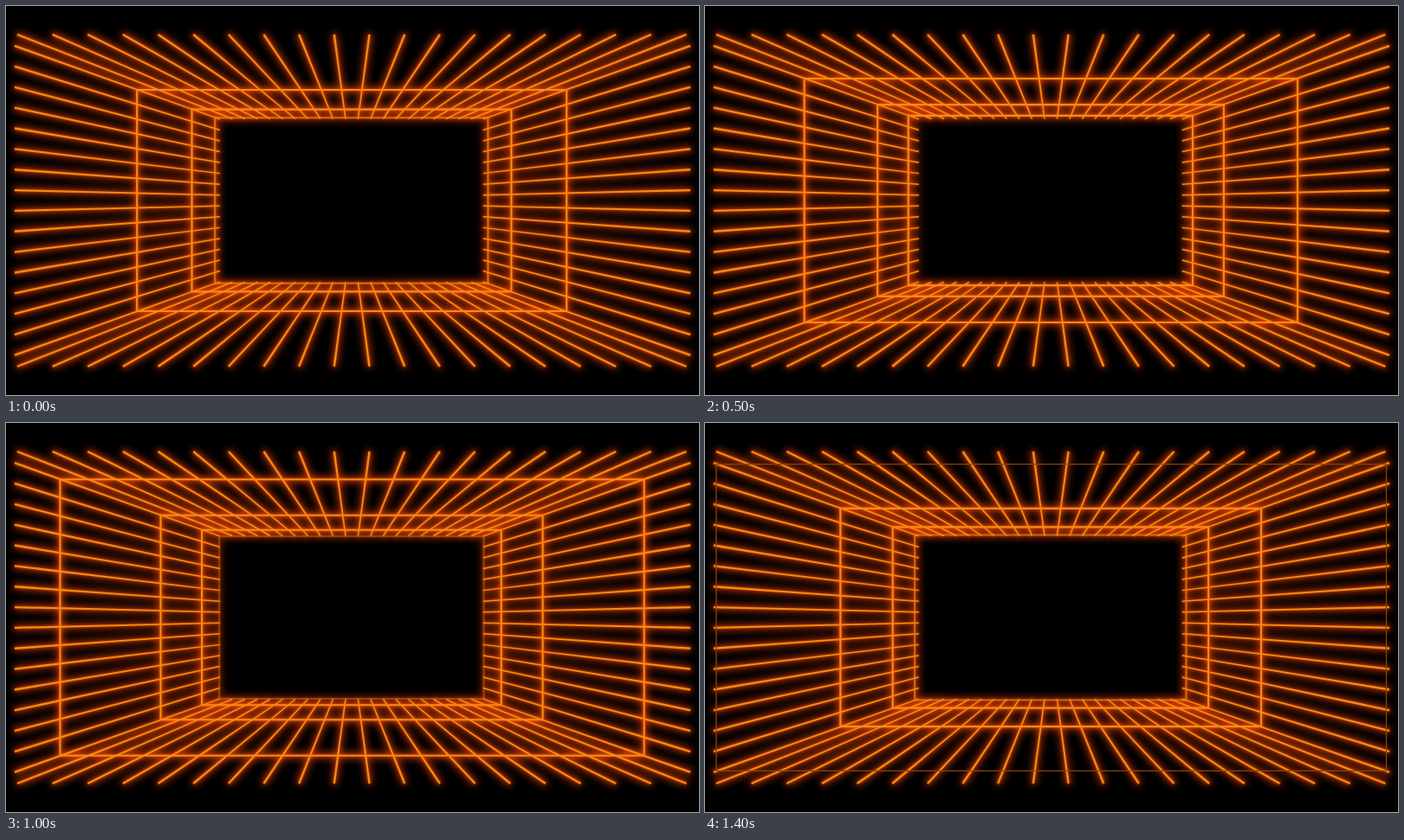
These frames come from a looping animation (800 by 450 pixels, 1500 ms). An HTML page:

```html
<!DOCTYPE html>
<html lang="en">
<head>
<meta charset="utf-8">
<title>Neon tunnel</title>
<style>
  html, body { margin: 0; width: 100%; height: 100%; overflow: hidden; background: #000; }
  svg { display: block; width: 100vw; height: 100vh; }
</style>
</head>
<body>
<svg viewBox="0 0 800 450">
  <defs>
    <filter id="wide" filterUnits="userSpaceOnUse" x="-20" y="-20" width="840" height="490" color-interpolation-filters="sRGB">
      <feGaussianBlur stdDeviation="5"/>
    </filter>
    <filter id="near" filterUnits="userSpaceOnUse" x="-20" y="-20" width="840" height="490" color-interpolation-filters="sRGB">
      <feGaussianBlur stdDeviation="1.6"/>
    </filter>
    <g id="spokes"></g>
    <g id="rings" fill="none"></g>
  </defs>
  <rect width="800" height="450" fill="#000"/>
  <g filter="url(#wide)" color="#ff4800" opacity=".9">
    <use href="#spokes" stroke="#ff4800" stroke-width="2.6"/>
    <use href="#rings" stroke="#ff4800" stroke-width="5"/>
  </g>
  <g filter="url(#near)" color="#ff5a00" opacity=".55">
    <use href="#spokes" stroke="#ff5a00" stroke-width=".8"/>
    <use href="#rings" stroke="#ff5a00" stroke-width="3"/>
  </g>
  <g color="#f88a14">
    <use href="#spokes"/>
    <use href="#rings" stroke="#f88a14" stroke-width="2.1"/>
    <path id="edge" fill="none" stroke="#8a430c" stroke-width="1.3"/>
  </g>
</svg>
<script>
const NS = 'http://www.w3.org/2000/svg';
const CX = 399.2, CY = 225;
const LOOP = 1500, HOLD = 100, PHASES = 18;
const spokes = document.getElementById('spokes');
const rings = document.getElementById('rings');
const edge = document.getElementById('edge');

function add(parent) {
  return parent.appendChild(document.createElementNS(NS, 'path'));
}

// A line that gets thinner towards the far end.
function taper(x1, y1, x2, y2) {
  const len = Math.hypot(x2 - x1, y2 - y1);
  const nx = (y1 - y2) / len, ny = (x2 - x1) / len;
  const a = 1.2, b = 0.75;
  const pts = [
    [x1 + nx * a, y1 + ny * a], [x2 + nx * b, y2 + ny * b],
    [x2 - nx * b, y2 - ny * b], [x1 - nx * a, y1 - ny * a]
  ];
  const path = add(spokes);
  path.setAttribute('d', 'M' + pts.map(p => p.map(v => v.toFixed(2)).join(' ')).join('L') + 'Z');
  path.setAttribute('fill', 'currentColor');
  path.setAttribute('stroke-linejoin', 'round');
}

for (const side of [-1, 1]) {
  for (let k = -9.5; k <= 9.5; k++) {
    taper(CX + k * 40.65, CY + side * 192, CX + k * 14.5, CY + side * 94.5);
  }
  for (let k = -7.5; k <= 7.5; k++) {
    taper(400 + side * 390, CY + k * 23.85, 398.8 + side * 152, CY + k * 12.55);
  }
}

const ringPaths = [0, 1, 2, 3].map(() => add(rings));

// Half width of a ring at depth s: grows by a fixed ratio per ring.
function halfWidth(s) {
  const lift = s > 0.5 ? 4.5 * Math.sin(Math.PI * (s - 0.5) / 0.48) ** 2 : 0;
  return 138 + 110 * Math.exp(0.863 * s) + lift;
}

function frame(w) {
  const h = 128 + 0.356 * (w - 248);
  const cx = CX + (w - 248) * 0.004;
  return `M${cx - w} ${CY - h}H${cx + w}V${CY + h}H${cx - w}Z`;
}

function draw(ms) {
  const step = Math.floor((ms % LOOP) / HOLD);
  const phase = Math.round(step * 1.2) / PHASES;
  const leaving = phase > 0.93;
  ringPaths.forEach((path, i) => {
    const w = halfWidth(phase - i);
    const far = Math.min(1, Math.max(0, (w - 148) / 14));
    path.setAttribute('d', frame(w));
    path.setAttribute('opacity', leaving && i === 0 ? 0 : w < 150 ? 0 : far);
  });
  edge.setAttribute('d', leaving ? frame(halfWidth(phase)) : '');
}

const start = performance.now();
function tick() {
  draw(performance.now() - start);
  requestAnimationFrame(tick);
}
draw(0);
tick();
</script>
</body>
</html>
```
